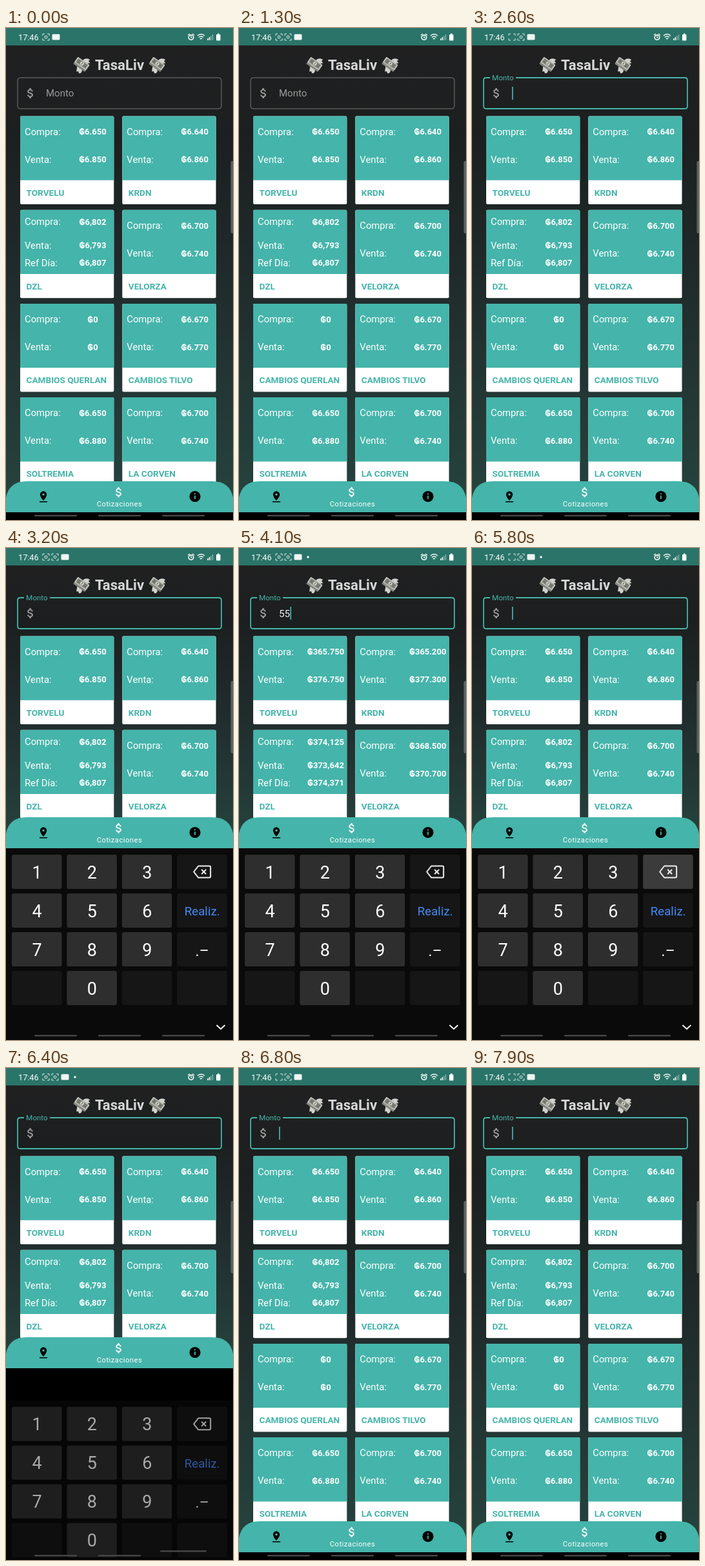
Animation of 352x762 px, one loop 8 s. Source, as an HTML page:

```html
<!DOCTYPE html>
<html lang="es">
<head>
<meta charset="utf-8">
<style>
html, body { margin: 0; width: 100%; height: 100%; overflow: hidden; background: #000; }
svg { display: block; width: 352px; height: 762px; font-family: Roboto, "Noto Sans", sans-serif; }
.mid { text-anchor: middle; }
.bold { font-weight: 700; }
</style>
</head>
<body>
<svg id="stage" viewBox="0 0 352 762"></svg>
<script>
const LOOP = 8000, TEAL = '#45b4aa', NAV_LOW = 702, NAV_HIGH = 417;
const FOCUS = 2300, OPEN = 2700, CLOSE = 6300, SLIDE = 300;
const TYPE = [3700, 4000, 4250, 4500], ERASE = [5150, 5350, 5550, 5750];

const DOLLAR = 'M11.8 10.9c-2.27-.59-3-1.2-3-2.15 0-1.09 1.01-1.85 2.7-1.85 1.78 0 2.44.85 2.5 2.1h2.21c-.07-1.72-1.12-3.3-3.21-3.81V3h-3v2.16c-1.94.42-3.5 1.68-3.5 3.61 0 2.31 1.91 3.46 4.7 4.13 2.5.6 3 1.48 3 2.41 0 .69-.49 1.79-2.7 1.79-2.06 0-2.87-.92-2.98-2.1h-2.2c.12 2.19 1.76 3.42 3.68 3.83V21h3v-2.15c1.95-.37 3.5-1.5 3.5-3.55 0-2.84-2.43-3.81-4.7-4.4z';
const PIN = 'M18 8c0-3.31-2.69-6-6-6S6 4.69 6 8c0 4.5 6 11 6 11s6-6.5 6-11zm-8 0c0-1.1.9-2 2-2s2 .9 2 2-.89 2-2 2c-1.1 0-2-.9-2-2zM5 20v2h14v-2H5z';

// name, thousands separator, rates (buy, sell, optional reference)
const BANKS = [
  ['TORVELU', '.', 6650, 6850], ['KRDN', '.', 6640, 6860],
  ['DZL', ',', 6802.27, 6793.49, 6806.74], ['VELORZA', '.', 6700, 6740],
  ['CAMBIOS QUERLAN', '.', 0, 0], ['CAMBIOS TILVO', '.', 6670, 6770],
  ['SOLTREMIA', '.', 6650, 6880], ['LA CORVEN', '.', 6700, 6740]
];
const KEYS = ['1', '2', '3', 'back', '4', '5', '6', 'Realiz.', '7', '8', '9', '.–', '', '0', '', ''];

const rect = (x, y, w, h, fill, more = '') =>
  `<rect x="${x}" y="${y}" width="${w}" height="${h}" fill="${fill}" ${more}/>`;
const text = (x, y, size, fill, str, more = '') =>
  `<text x="${x}" y="${y}" font-size="${size}" fill="${fill}" ${more}>${str}</text>`;
const line = (d, color, width, more = '') =>
  `<path d="${d}" fill="none" stroke="${color}" stroke-width="${width}" ${more}/>`;
const icon = (d, cx, cy, fill) =>
  `<path d="${d}" fill="${fill}" transform="translate(${cx} ${cy}) scale(.86) translate(-12 -12)"/>`;
const group = (id, inner, more = '') => `<g id="${id}" ${more}>${inner}</g>`;

function card([name, , ...rates], i) {
  const x = i % 2 ? 180.3 : 22, y = 136.5 + (i >> 1) * 145.2;
  const rows = rates.length > 2 ? [18, 54.5, 81.5] : [24, 67];
  return rect(x, y, 145.3, 136.5, '#fff', 'rx="2"') +
    `<path d="M${x} ${y + 99.3}v-97.3q0-2 2-2h141.3q2 0 2 2v97.3z" fill="${TEAL}"/>` +
    rows.map((dy, k) =>
      text(x + 7, y + dy + 5.3, 14.8, '#fff', ['Compra:', 'Venta:', 'Ref Día:'][k]) +
      text(x + 112.5, y + dy + 4.8, 13, '#fff', '', 'class="mid bold rate"')).join('') +
    text(x + 9.5, y + 123, 13.6, TEAL, name, 'class="bold"');
}

function key(label, i) {
  const x = 9 + i % 4 * 85.4, y = 475 + (i >> 2) * 60, cx = x + 39;
  const special = i % 4 == 3 || !label;
  let face = '';
  if (label == 'back') {
    face = line(`M${cx - 13} 501.5l7-9h17q2 0 2 2v14q0 2-2 2h-17z`, '#eee', 2, 'stroke-linejoin="round"') +
      line(`M${cx - 1} 498l7 7m0-7l-7 7`, '#eee', 2);
  } else if (label == 'Realiz.') {
    face = text(cx, y + 34, 18.7, '#4489f2', label, 'class="mid"');
  } else {
    face = text(cx, y + 36.5, label == '.–' ? 23 : 27, '#fff', label, 'class="mid"');
  }
  return rect(x, y, 77.5, 53, special ? '#161616' : '#2e2e2e', `rx="3" id="key${i}"`) + face;
}

const money = x => `<g transform="translate(${x} 56.5) rotate(35)">` +
  '<path d="M-3-5q1-8 9-8l-1 3 4 1-3 3 3 2-7 3zM3 5q6 6 1 9l-3-2-2 2-4-8z" fill="#d2d2cd"/>' +
  rect(-12, -6, 22, 13, '#85867f', 'rx="1"') + rect(-12, -6, 22, 10, '#c0c1b8', 'rx="1"') +
  rect(-10, -4.4, 18, 6.8, '#777a72') + '<circle cx="-1" cy="-1" r="3" fill="#d4d4cc"/>' +
  line('M-1-3v4', '#50524d', 1) + '</g>';

const capture = (id, x) => group(id,
  line(`M${x - 5} 12v-3h3m4 0h3v3m0 4v3h-3m-4 0h-3v-3`, '#d5e4e1', 1) +
  group(id + 'Core', `<circle cx="${x}" cy="14" r="2" fill="none" stroke="#e4efed"/>`));

const statusBar = rect(0, 0, 352, 27, '#2a7469') +
  text(19, 18.7, 12.7, '#fff', '17:46') + capture('cap1', 62) + capture('cap2', 76) +
  group('app', rect(71.5, 9.5, 12, 9, '#f0f5f4', 'rx="1.5"')) +
  '<circle id="dot" cx="107" cy="14" r="1.7" fill="#fff"/>' +
  '<circle cx="287" cy="14.5" r="3.8" fill="none" stroke="#fff" stroke-width="1.6"/>' +
  line('M287 12v3h2M282 11l3-2m4 0l3 2', '#fff', 1.2) +
  line('M297 12q5.500-5 11 0M299 14.500q3.500-3 7 0M301 17q1.500-1.500 3 0', '#fff', 1.5) +
  line('M313 19v-3m2.500 3v-5', '#fff', 1.5) + line('M318 19v-7m2.500 7v-9', '#8fb5af', 1.3) +
  rect(326, 10, 6.5, 9.5, '#fff', 'rx="1"') + rect(328, 8.5, 2.5, 2, '#fff');

const $ = id => document.getElementById(id);
$('stage').innerHTML =
  `<defs><linearGradient id="shade" x2="0" y2="1">
    <stop stop-color="#202021"/><stop offset=".2" stop-color="#1c1f1f"/>
    <stop offset=".5" stop-color="#202b2b"/><stop offset="1" stop-color="#26443f"/>
  </linearGradient></defs>` +
  rect(0, 27, 352, 723, 'url(#shade)', 'id="back"') +
  money(118) + money(235) + text(176, 65, 22.2, '#d8d8d8', 'TasaLiv', 'class="mid bold"') +
  line('', '#777', 1, 'id="frame"') + icon(DOLLAR, 38, 101, '#a2a2a2') +
  text(0, 0, 15, '#999', 'Monto', 'id="label"') +
  text(62, 106.6, 15.3, '#f2f2f2', '', 'id="amount"') + rect(62, 91, 1.7, 20, TEAL, 'id="caret"') +
  BANKS.map(card).join('') +
  rect(0, 750, 352, 12, '#000', 'id="below"') +
  group('keyboard', rect(0, 465, 352, 297, '#0a0a0a') + KEYS.map(key).join('') +
    line('M326.500 739l6.500 6 6.500-6', '#fff', 2)) +
  group('nav', `<path d="M0 48V25Q5 0 32 0H320Q347 0 352 25V48z" fill="${TEAL}"/>` +
    icon(PIN, 58, 24, '#000') + icon(DOLLAR, 175, 17, '#fff') +
    text(176, 39, 11.2, '#fff', 'Cotizaciones', 'class="mid" letter-spacing=".5"') +
    '<circle cx="293" cy="23.5" r="8.6" fill="#000"/>' +
    line('M293 18.500v2m0 1.700v5.500', TEAL, 1.8)) +
  statusBar + rect(348.5, 206, 6, 112, '#596363', 'rx="2"') +
  [44, 143, 242].map((x, i) => rect(x, 754, 66, 2.6, '#454545', `rx="1.3" id="grip${i}"`)).join('');

const rateNodes = [...document.querySelectorAll('.rate')];
const rates = BANKS.flatMap(([, sep, ...list]) => list.map(rate => ({ sep, rate })));

const set = (id, attrs) => { for (const k in attrs) $(id).setAttribute(k, attrs[k]); };
const show = (id, on) => set(id, { visibility: on ? 'visible' : 'hidden' });
const ramp = (t, start, length) => Math.min(1, Math.max(0, (t - start) / length));
const ease = p => p * p * (3 - 2 * p);
const mix = (a, b, p) => a + (b - a) * p;
const passed = (list, t) => list.filter(s => t >= s).length;
const pressed = (list, t) => list.some(s => t >= s - 80 && t < s + 60);

function drawField(t, typed) {
  const f = ease(ramp(t, FOCUS, 170)), on = t >= FOCUS;
  set('frame', {
    d: `M28 77H22q-4 0-4 4V121q0 4 4 4H330q4 0 4-4V81q0-4-4-4H${mix(28, 68, f)}`,
    stroke: on ? TEAL : '#777', 'stroke-width': on ? 1.8 : 1
  });
  set('label', {
    x: mix(62, 31, f), y: mix(106.3, 81, f),
    'font-size': mix(15, 11.7, f), fill: on ? TEAL : '#999'
  });
  $('amount').textContent = '5'.repeat(typed);
  const last = [FOCUS, ...TYPE, ...ERASE].filter(s => t >= s).pop();
  show('caret', on && (t - last) % 1000 < 500);
  set('caret', { x: 62 + typed * 8.7 });
}

function drawRates(typed) {
  const factor = typed ? +'5'.repeat(typed) : 1;
  rates.forEach(({ sep, rate }, i) => {
    const value = '₲' + String(Math.round(rate * factor)).replace(/\B(?=(\d{3})+$)/g, sep);
    rateNodes[i].textContent = value;
    rateNodes[i].setAttribute('font-size', Math.min(13, 113 / value.length));
  });
}

function drawKeyboard(t) {
  const up = t >= OPEN && t < CLOSE + SLIDE;
  const p = ramp(t, OPEN, SLIDE) - ramp(t, CLOSE, SLIDE);
  const top = up ? NAV_HIGH : NAV_LOW;
  set('nav', { transform: `translate(0 ${top})` });
  set('back', { height: top + 21 });
  set('below', { y: top + 48, height: 714 - top });
  set('keyboard', { transform: `translate(0 ${(1 - p) * 148})`, opacity: p });
  show('keyboard', up);
  set('key5', { fill: pressed(TYPE, t) ? '#454545' : '#2e2e2e' });
  set('key3', { fill: pressed(ERASE, t) ? '#3b3b3b' : '#161616' });
  const lift = Math.sin(Math.PI * ramp(t, CLOSE - 100, 400));
  set('grip2', { y: 754 - 7 * lift, x: 242 - 3 * lift, width: 66 + 6 * lift });
}

function drawStatus(t) {
  const both = t >= 1000, blink = t % 1060;
  show('cap2', both);
  show('cap2Core', both);
  show('cap1Core', blink < 300 || blink > 800);
  set('app', { transform: `translate(${both ? 14 : 0} 0)` });
  show('dot', t >= 3600 && t < 6700);
}

function draw(now) {
  const t = now % LOOP, typed = passed(TYPE, t) - passed(ERASE, t);
  drawField(t, typed);
  drawRates(typed);
  drawKeyboard(t);
  drawStatus(t);
}

const start = performance.now();
function tick() {
  draw(performance.now() - start);
  requestAnimationFrame(tick);
}
tick();
</script>
</body>
</html>
```
